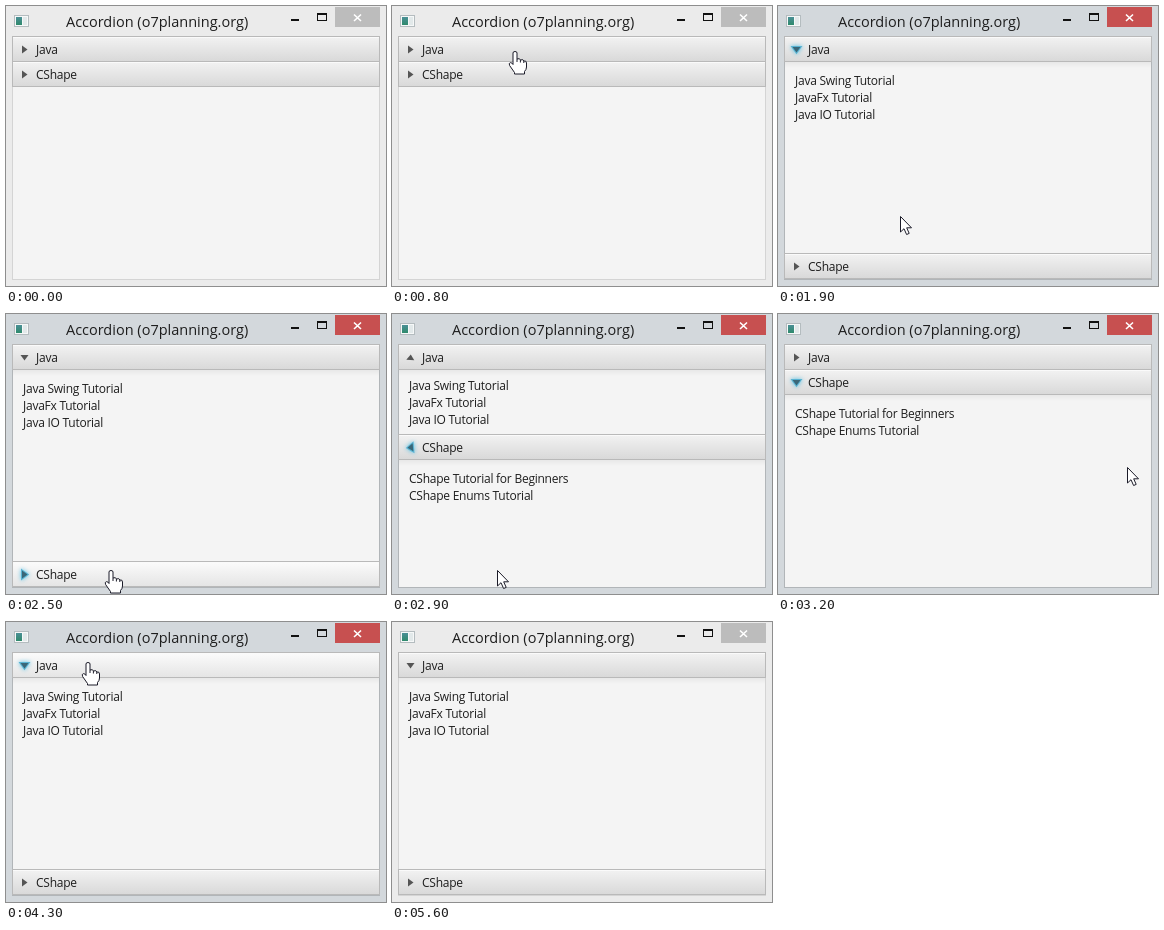
Animation of 380 by 280 pixels, one loop 5.8 s. Source, as an HTML page with a canvas:

```html
<!DOCTYPE html>
<html lang="en">
<head>
<meta charset="utf-8">
<title>Accordion</title>
<style>
html, body { margin: 0; width: 100%; height: 100%; overflow: hidden; background: #ebebeb; }
canvas { display: block; }
</style>
</head>
<body>
<canvas id="stage" width="380" height="280"></canvas>
<script>
const ctx = document.getElementById('stage').getContext('2d');
const LOOP = 5800, STEP = 100, BODY = 192;
const FONT = '"Open Sans", "Noto Sans", sans-serif';

const JAVA = ['Java Swing Tutorial', 'JavaFx Tutorial', 'Java IO Tutorial'];
const CSHAPE = ['CShape Tutorial for Beginners', 'CShape Enums Tutorial'];

// Pointer stops: [ms, x, y], with straight moves in between
const STOPS = [
  [400, 322, 38], [600, 190, 43], [800, 123, 45], [1500, 123, 45],
  [1600, 141, 62], [1700, 170, 112], [1800, 150, 168], [1900, 122, 210],
  [2100, 107, 246], [2200, 105, 256], [3000, 105, 256],
  [3200, 349, 153], [3400, 225, 86], [3500, 150, 62], [3600, 100, 47], [3700, 82, 40],
  [4600, 82, 40], [4700, 150, 44], [4800, 255, 58], [4900, 355, 71]
];

const ARROW = new Path2D('M.5 .5V16L4 12.7L6.6 18.5L9.2 17.4L6.7 11.8H11.5Z');
const HAND = new Path2D('M-2 2Q-2 .5 0 .5Q2 .5 2 2V8Q5 6.8 5.4 9Q8.4 7.8 8.8 10Q11.5 9.4 11.5 12' +
  'V16Q11.5 18.5 9.5 20.5V23H-.5V21.5L-5.4 14.5Q-6.6 12 -4.4 11.6Q-3 11.6 -2 13.5Z');
const KNUCKLES = new Path2D('M2 8V11M5.4 9V11.5M8.8 10V12');

// Gentle start and stop, straight in between
function ease(ms) {
  const k = Math.max(0, Math.min(1, ms / 350));
  if (k < 0.2) return 3.125 * k * k;
  if (k > 0.8) return 1 - 3.125 * (1 - k) * (1 - k);
  return 1.25 * k - 0.125;
}

function pointerAt(t) {
  const i = STOPS.findIndex(s => s[0] >= t);
  if (i < 0 || t < STOPS[0][0]) return null;
  const [tb, xb, yb] = STOPS[i], [ta, xa, ya] = STOPS[Math.max(0, i - 1)];
  const k = tb > ta ? (t - ta) / (tb - ta) : 1;
  return { x: Math.round(xa + (xb - xa) * k), y: Math.round(ya + (yb - ya) * k) };
}

function box(x, y, w, h, fill) {
  ctx.fillStyle = fill;
  ctx.fillRect(x, y, w, h);
}

function fade(y0, y1, from, to) {
  const g = ctx.createLinearGradient(0, y0, 0, y1);
  g.addColorStop(0, from);
  g.addColorStop(1, to);
  return g;
}

function label(text, x, y, size = 12, spacing = '-0.25px') {
  ctx.font = size + 'px ' + FONT;
  ctx.letterSpacing = spacing;
  ctx.fillStyle = '#1e1e1e';
  ctx.fillText(text, x, y);
}

function drawFrame(active) {
  const back = active ? '#d3d8dc' : '#ebebeb';
  box(0, 0, 380, 280, back);

  // Program icon
  box(8, 9, 15, 12, '#b4bcbf');
  box(9, 10, 13, 10, '#f6f8f8');
  box(10, 11, 6, 8, fade(11, 19, '#4b8f96', '#2f8a6c'));
  box(17, 11, 4, 8, '#e2e9ea');

  label('Accordion (o7planning.org)', 60, 21, 14.5, '0px');

  box(285, 13, 8, 2, '#111');
  box(311, 7, 10, 8, '#111');
  box(312, 9, 8, 5, back);

  box(329, 1, 45, 20, active ? '#c75050' : '#bcbcbc');
  ctx.strokeStyle = '#fff';
  ctx.lineWidth = 1.6;
  ctx.beginPath();
  ctx.moveTo(348, 8.5); ctx.lineTo(355, 15);
  ctx.moveTo(355, 8.5); ctx.lineTo(348, 15);
  ctx.stroke();

  box(6, 30, 368, 244, active ? '#b1b5b8' : '#d4d4d4');
  box(7, 31, 366, 242, '#f4f4f4');
}

// The mark spins two and a quarter turns while its pane opens
function drawMark(y, open, focused) {
  ctx.save();
  ctx.translate(18.5, y);
  ctx.rotate(4.5 * Math.PI * open);
  ctx.beginPath();
  ctx.moveTo(-2.5, -4);
  ctx.lineTo(3, 0);
  ctx.lineTo(-2.5, 4);
  ctx.closePath();
  if (focused) {
    ctx.shadowColor = '#45bbe2';
    ctx.shadowBlur = 4;
    ctx.strokeStyle = '#58b3d3';
    ctx.lineWidth = 2;
    ctx.stroke();
    ctx.shadowBlur = 0;
  }
  ctx.fillStyle = focused ? '#3a6778' : '#555';
  ctx.fill();
  ctx.restore();
}

function drawHeader(y, text, open, focused, hover) {
  box(6, y, 368, 26, '#b9b9b9');
  box(7, y + 1, 366, 24, hover
    ? fade(y + 1, y + 25, '#fbfbfb', '#e5e5e5')
    : fade(y + 1, y + 25, '#f2f2f2', '#d9d9d9'));
  box(7, y + 1, 366, 1, '#fafafa');
  drawMark(y + 13.5, open, focused);
  label(text, 30, y + 18);
}

function drawBody(y, h, lines) {
  if (h < 1) return;
  ctx.save();
  ctx.beginPath();
  ctx.rect(7, y, 366, Math.min(h, 273 - y));
  ctx.clip();
  box(7, y, 366, 6, fade(y, y + 6, '#e8e8e8', '#f4f4f4'));
  // A body too low for its list keeps the list centred
  const lift = Math.max(0, Math.floor((lines.length * 17 + 20 - h) / 2));
  lines.forEach((s, i) => label(s, 17, y + 23 + i * 17 - lift));
  ctx.restore();
}

function drawPointer(p, hand) {
  const shape = hand ? HAND : ARROW;
  ctx.save();
  ctx.translate(p.x, p.y);
  ctx.lineWidth = 1;
  ctx.lineJoin = 'round';
  ctx.fillStyle = '#fff';
  ctx.strokeStyle = '#1b1b28';
  ctx.fill(shape);
  ctx.stroke(shape);
  if (hand) ctx.stroke(KNUCKLES);
  ctx.restore();
}

function draw(t) {
  const active = t >= 1000 && t < 5600;
  const swap = ease(t - 2680), back = ease(t - 3927);
  const second = swap - back;
  const first = ease(t - 1027) - second;
  const h1 = Math.floor(BODY * first), h2 = BODY * second;
  const y1 = 30, y2 = 55 + h1;
  const onSecond = t >= 2500 && t < 3800;

  const p = pointerAt(t);
  const over = y => !!p && p.y > y && p.y <= y + 25;

  drawFrame(active);
  drawBody(56, h1, JAVA);
  drawBody(y2 + 26, h2, CSHAPE);
  drawHeader(y1, 'Java', first, active && !onSecond, active && over(y1));
  drawHeader(y2, 'CShape', second, active && onSecond, active && over(y2));
  if (p) drawPointer(p, over(y1) || over(y2));
}

const start = performance.now();
function tick() {
  const t = (performance.now() - start) % LOOP;
  draw(Math.floor(t / STEP) * STEP);
  requestAnimationFrame(tick);
}
tick();
</script>
</body>
</html>
```
